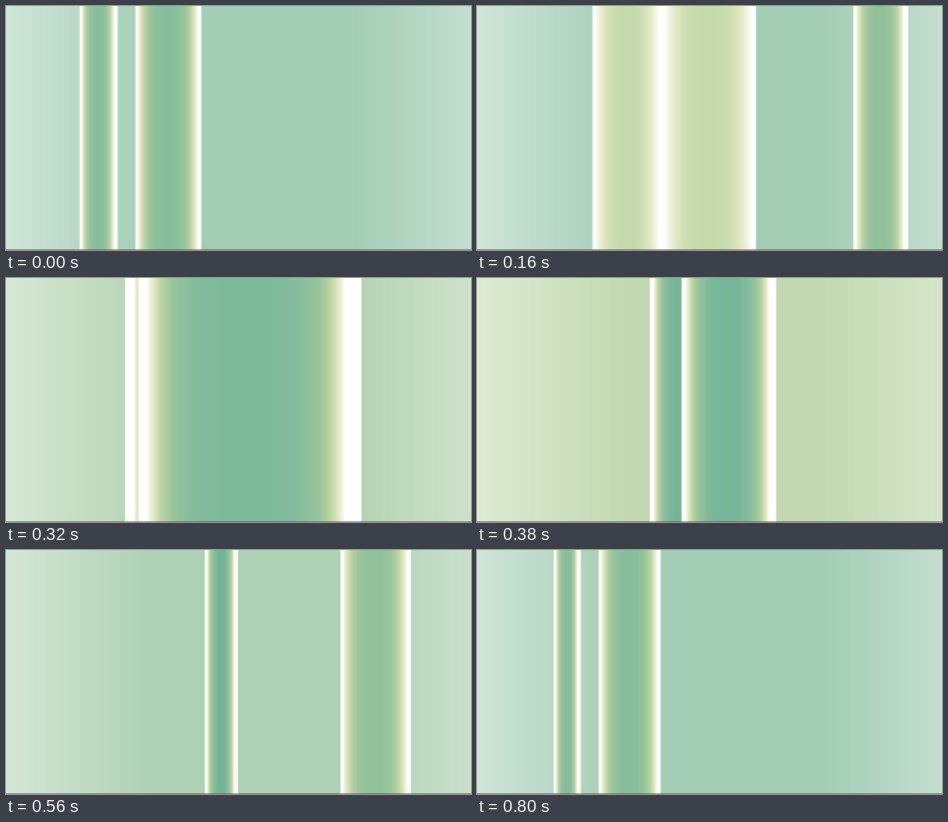
Write an HTML page with a canvas that moves like this. It is 600 px wide and 316 px high and loops after 820 ms.

```html
<!DOCTYPE html>
<html>
<head>
<meta charset="utf-8">
<style>
html, body { margin: 0; width: 100%; height: 100%; overflow: hidden; }
canvas { display: block; }
</style>
</head>
<body>
<canvas id="stage" width="600" height="316"></canvas>
<script>
const LOOP = 820, STEP = 20, W = 600, H = 316;
const ctx = document.getElementById('stage').getContext('2d');

const clamp = v => Math.min(1, Math.max(0, v));
const mix = (a, b, k) => a.map((v, i) => v + (b[i] - v) * k);
const rgb = hex => [0, 2, 4].map(i => parseInt(hex.slice(i, i + 2), 16));
const swell = (t, center, spread) => Math.exp(-(((t - center) / spread) ** 2));

const [coolPale, coolDeep, warmPale, warmDeep] =
  ['cfe5d6', 'a3cdb5', 'dfead2', 'c4d9b1'].map(rgb);
// Stripe colours from rim to core, a quarter of a level apart
const glow = ['ffffff', 'e4e9c6', 'bcd4a4', '9ac59a', '84bc9d', '6cb092'].map(rgb);

// Key points through which the edges of the two main stripes glide
const times = [0, 160, 260, 380, 560, 700, 800];
const main = [
  { left: [95, 149, 91, 223, 257, 139, 99], right: [144, 240, 300, 300, 299, 190, 134] },
  { left: [167, 239, 91, 264, 257, 139, 157], right: [252, 360, 507, 386, 299, 190, 237] }
];

// Smooth cyclic curve through unevenly timed points
function glide(values, t) {
  const n = times.length, at = i => values[(i + n) % n];
  const time = i => times[(i + n) % n] + Math.floor(i / n) * LOOP;
  const slope = i => (at(i + 1) - at(i - 1)) / (time(i + 1) - time(i - 1));
  const i = times.filter(v => v <= t).length - 1;
  const span = time(i + 1) - time(i), u = (t - time(i)) / span;
  const ease = u * u * (3 - 2 * u);
  return at(i) + (at(i + 1) - at(i)) * ease
    + span * u * (1 - u) * (slope(i) * (1 - u) - slope(i + 1) * u);
}

// The right-hand stripe opens and closes twice per loop
function sideStripe(t) {
  const phase = 2 * Math.PI * (t - 155) / LOOP, sway = Math.cos(phase);
  const center = 499 + 22 * sway, half = (81 - 10 * sway) * Math.cos(2 * phase) / 2;
  return { left: center - half, right: center + half, depth: 0.86 };
}

function stripesAt(t) {
  const depth = 0.97 + 0.28 * swell(t, 480, 150) - 0.53 * swell(t, 160, 60);
  const pair = main.map(({ left, right }) =>
    ({ left: glide(left, t), right: glide(right, t), depth }));
  return [sideStripe(t), ...pair];
}

function backdrop(x, heat) {
  const shade = Math.min(1, x / 190, (660 - x) / 210);
  return mix(mix(coolPale, coolDeep, shade), mix(warmPale, warmDeep, shade), heat);
}

function stripeColor({ left, right, depth }, x, rim) {
  const width = right - left, fromLeft = x - left, fromRight = right - x;
  const rise = clamp(Math.min(fromLeft - rim, fromRight - 2 * rim) / (width / 2 - 1.5 * rim));
  const level = 4 * depth * (1 - (1 - rise) ** (2 + width / 140));
  const i = Math.min(glow.length - 2, Math.floor(level));
  return mix(glow[i], glow[i + 1], Math.min(1, level - i));
}

function draw(t) {
  const stripes = stripesAt(t);
  const heat = Math.min(1, 1.1 * swell(t, 425, 120));
  const rim = 2 + 10 * swell(t, 290, 75);
  for (let x = 0; x < W; x++) {
    const px = x + 0.5;
    let color = backdrop(px, heat);
    for (const s of stripes) {
      const cover = clamp(Math.min(px - s.left, s.right - px) / 2 + 0.5);
      if (s.right > s.left && cover) color = mix(color, stripeColor(s, px, rim), cover);
    }
    ctx.fillStyle = `rgb(${color.map(Math.round)})`;
    ctx.fillRect(x, 0, 1, H);
  }
  ctx.fillStyle = 'rgba(40,60,50,.55)';
  ctx.fillRect(0, H - 1, W, 1);
}

const start = performance.now();
function tick() {
  const t = (performance.now() - start) % LOOP;
  draw(Math.floor(t / STEP) * STEP);
  requestAnimationFrame(tick);
}
tick();
</script>
</body>
</html>
```
